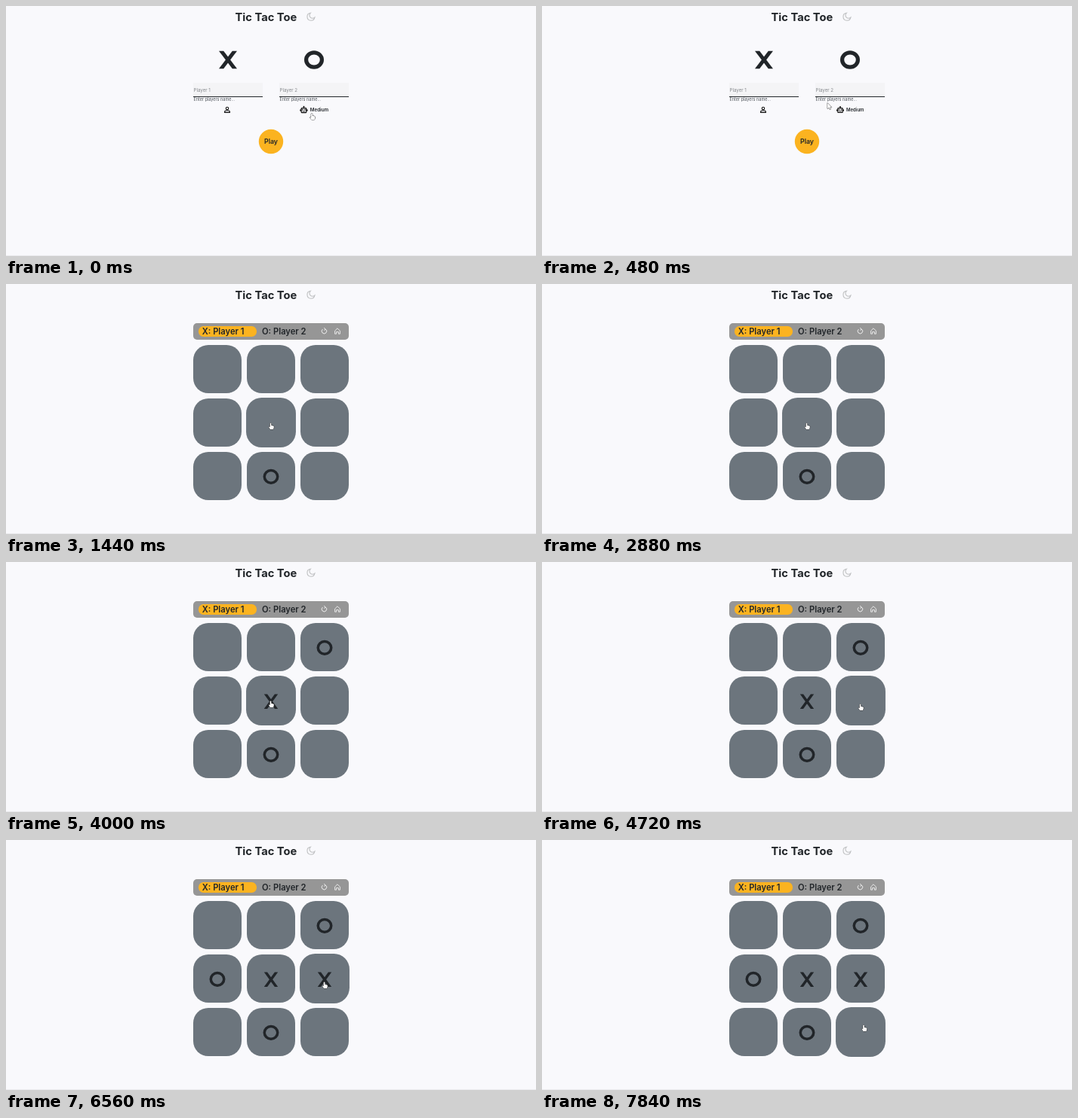
An HTML page with a canvas for the animation above (8 s loop, 702x332 px).

```html
<!DOCTYPE html>
<html lang="en">
<head>
<meta charset="utf-8">
<title>Tic Tac Toe</title>
<style>
  html, body { margin: 0; width: 100%; height: 100%; overflow: hidden; background: #f9f9fc; }
  canvas { display: block; }
</style>
</head>
<body>
<canvas id="stage" width="702" height="332"></canvas>
<script>
const ctx = document.getElementById('stage').getContext('2d');
const LOOP = 8000, STEP = 80, START = 1440;
const INK = '#212529', GOLD = '#fbb320', SLATE = '#6c757d';

// Pointer tip: time, x, y
const PATH = [
  [0, 405, 142.5], [320, 385, 115], [880, 350.5, 184.5],
  [4160, 350.5, 184.5], [4240, 351, 184.5], [4560, 351, 184.5],
  [4720, 421.5, 188.5], [6880, 421.5, 188.5], [7440, 426, 245.5]
];

// Moves: time, column, row, mark
const MOVES = [
  [START, 1, 2, 'O'], [3600, 1, 1, 'X'], [3600, 2, 0, 'O'],
  [6160, 2, 1, 'X'], [6160, 0, 1, 'O']
];

function pointerAt(t) {
  let i = 0;
  while (i < PATH.length - 1 && PATH[i + 1][0] <= t) i++;
  const a = PATH[i], b = PATH[i + 1] || a;
  const k = b === a ? 0 : (t - a[0]) / (b[0] - a[0]);
  const e = k * k * (3 - 2 * k);
  return { x: a[1] + (b[1] - a[1]) * e, y: a[2] + (b[2] - a[2]) * e };
}

function text(s, x, y, size, weight, color = INK, align = 'left') {
  ctx.font = `${weight} ${size}px Inter, "Open Sans", sans-serif`;
  ctx.textAlign = align;
  ctx.fillStyle = color;
  ctx.fillText(s, x, y);
}

function box(x, y, w, h, r, color) {
  ctx.fillStyle = color;
  ctx.beginPath();
  ctx.roundRect(x, y, w, h, r);
  ctx.fill();
}

function disc(x, y, r, color) {
  ctx.fillStyle = color;
  ctx.beginPath();
  ctx.arc(x, y, r, 0, 7);
  ctx.fill();
}

function line(d, color, width) {
  ctx.strokeStyle = color;
  ctx.lineWidth = width;
  ctx.stroke(new Path2D(d));
}

function scaled(x, y, k, draw) {
  ctx.save();
  ctx.translate(x, y);
  ctx.scale(k, k);
  draw();
  ctx.restore();
}

function cross(x, y, w, h, bar) {
  ctx.fillStyle = INK;
  for (const s of [1, -1]) {
    ctx.beginPath();
    ctx.moveTo(x - s * w, y - h);
    ctx.lineTo(x - s * (w - bar), y - h);
    ctx.lineTo(x + s * w, y + h);
    ctx.lineTo(x + s * (w - bar), y + h);
    ctx.fill();
  }
}

function ring(x, y, rx, ry, width) {
  ctx.strokeStyle = INK;
  ctx.lineWidth = width;
  ctx.beginPath();
  ctx.ellipse(x, y, rx - width / 2, ry - width / 2, 0, 0, 7);
  ctx.stroke();
}

function header() {
  text('Tic Tac Toe', 303.5, 20.3, 14.7, 700);
  line('M403.2 9.3A5 5 0 1 0 408.9 15.1A3.9 3.9 0 0 1 403.2 9.3Z', '#bfc0c2', 1.1);
  ctx.fillStyle = '#ebebee';
  ctx.fillRect(0, 331, 702, 1);
}

function field(x, label) {
  ctx.fillStyle = '#f4f4f6';
  ctx.fillRect(x, 102, 92, 18);
  ctx.fillStyle = INK;
  ctx.fillRect(x, 120, 92, 1);
  text(label, x + 0.5, 113.6, 6.2, 400, '#85898d');
  text('Enter players name...', x + 0.5, 126.4, 5.5, 400, '#4b5157');
}

function robot() {
  box(-3.7, -2.9, 7.4, 7, 1.2, '#111');
  box(-5, -0.8, 10, 2.6, 1, '#111');
  disc(0, -4, 1.1, '#111');
  box(-2.6, -1.8, 5.2, 4.8, 0.4, '#f9f9fc');
  disc(-1.4, -0.3, 0.8, '#111');
  disc(1.4, -0.3, 0.8, '#111');
  ctx.fillStyle = '#111';
  ctx.fillRect(-1.8, 1.4, 3.6, 0.9);
}

function menu(p) {
  cross(294, 71.5, 12, 11.7, 6.2);
  ring(408, 71.5, 13, 12.2, 5.2);
  field(248, 'Player 1');
  field(362, 'Player 2');

  line('M291.3 136a1.7 1.7 0 1 0 3.4 0a1.7 1.7 0 1 0 -3.4 0'
    + 'M289.6 141.4v-.8c0-1.2 2-1.8 3.4-1.8s3.4 .6 3.4 1.8v.8z', '#111', 1.1);

  const overLevel = Math.abs(p.x - 408) < 20 && Math.abs(p.y - 138) < 6;
  scaled(408.5, 138, overLevel ? 1.04 : 1, () => {
    ctx.translate(-13.5, 0);
    robot();
    text('Medium', 8, 2.2, 6, 600);
  });

  const overPlay = Math.hypot(p.x - 351, p.y - 180) < 16.5;
  scaled(351, 180, overPlay ? 1.04 : 1, () => {
    disc(0, 0, 16.2, GOLD);
    text('Play', 0, 3, 8.8, 600, INK, 'center');
  });
  return overLevel || overPlay;
}

function board(t, p) {
  box(248, 52, 206, 22, 5, '#969696');
  box(255, 56, 77, 14, 6.5, GOLD);
  text('X: Player 1', 259.7, 67, 11.2, 600);
  text('O: Player 2', 339, 67, 11.2, 600);
  line('M419.4 60.2A3.2 3.2 0 1 0 423.4 60.1M421.2 58.2L423.2 60L421.4 61.6', '#f1f1f1', 1);
  line('M435.6 62.2L439 58.8L442.4 62.2V66.2H440.4V63.6H437.6V66.2H435.6Z', '#f1f1f1', 0.9);

  let over = false;
  for (let i = 0; i < 9; i++) {
    const x = 280 + 71 * (i % 3), y = 113 + 71 * Math.floor(i / 3);
    const hot = Math.abs(p.x - x) < 32 && Math.abs(p.y - y) < 32;
    over = over || hot;
    scaled(x, y, hot ? 1.03 : 1, () => box(-32, -32, 64, 64, 20, SLATE));
  }
  for (const [at, col, row, mark] of MOVES) {
    if (t < at) continue;
    const x = 280 + 71 * col, y = 113 + 71 * row;
    if (mark === 'X') cross(x, y + 1.3, 9.2, 9.8, 4.3);
    else ring(x, y + 0.8, 10.5, 10.1, 3.5);
  }
  return over;
}

const HAND = new Path2D('M-.8 .6Q0-.6 .8 .6V3.2L3.6 3.9Q4.5 4.2 4.4 5.2L3.6 8.4H-.4L-2.5 5.4Q-2.2 4.4-.8 5.4Z');
const ARROW = new Path2D('M0 0V7.6L1.8 6L3 8.7L4.2 8.2L3 5.6H5.4Z');

function pointer(p, hand) {
  ctx.save();
  ctx.translate(p.x, p.y);
  ctx.lineWidth = 0.9;
  ctx.lineJoin = 'round';
  ctx.strokeStyle = '#222';
  ctx.fillStyle = '#fff';
  const shape = hand ? HAND : ARROW;
  ctx.stroke(shape);
  ctx.fill(shape);
  ctx.restore();
}

function draw(now) {
  const t = Math.floor((now % LOOP) / STEP) * STEP;
  const p = pointerAt(t);
  ctx.fillStyle = '#f9f9fc';
  ctx.fillRect(0, 0, 702, 332);
  header();
  pointer(p, t < START ? menu(p) : board(t, p));
}

const begin = performance.now();
function tick() {
  draw(performance.now() - begin);
  requestAnimationFrame(tick);
}
tick();
</script>
</body>
</html>
```
